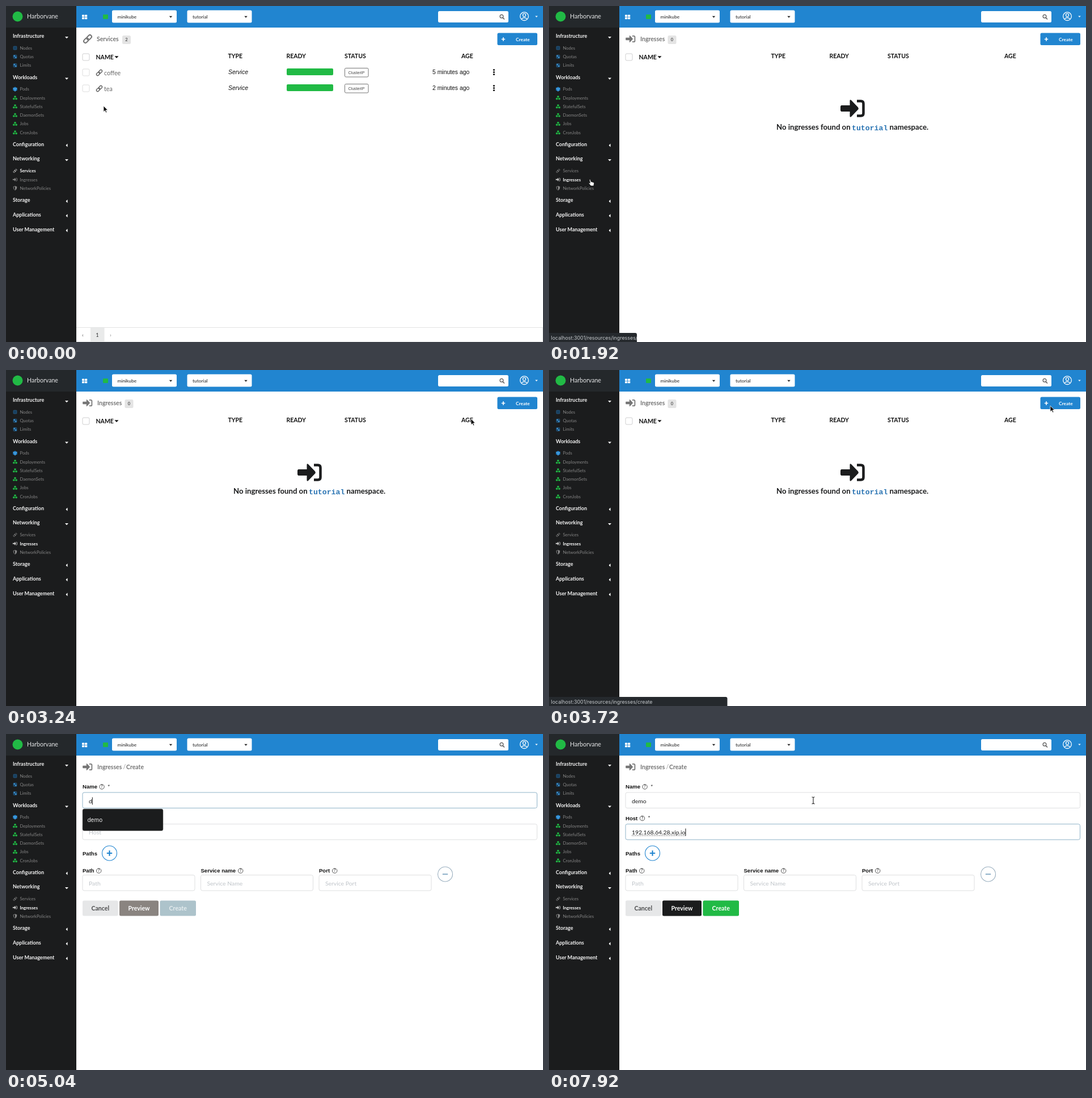
Animation of 947x592 px, one loop 8000 ms. Source, as an HTML page:

```html
<!DOCTYPE html>
<html lang="en">
<head>
<meta charset="utf-8">
<title>Ingress demo</title>
<style>
html, body { margin: 0; width: 100%; height: 100%; overflow: hidden; background: #fff; }
svg { display: block; width: 947px; height: 592px; }
text { font-family: Lato, sans-serif; white-space: pre; }
.b { font-weight: 700; }
.h { font-family: "Liberation Sans", Arial, sans-serif; }
.m { font-family: "Liberation Mono", monospace; }
.s { font-family: Inter, sans-serif; }
</style>
</head>
<body>
<svg id="stage" viewBox="0 0 947 592"></svg>
<script>
const stage = document.getElementById('stage');
const pen = document.createElement('canvas').getContext('2d');
const LOOP = 8000, STEP = 120;
const BLUE = '#2185d0', GREEN = '#21ba45', DARK = '#1b1c1d';
const HOST = '192.168.64.28.xip.io';

// Drawing helpers; text is placed by the middle of its capitals.
const text = (x, mid, str, size, fill = DARK, cls = '', extra = '') =>
  `<text x="${x}" y="${mid + size * .36}" font-size="${size}" fill="${fill}" class="${cls}" ${extra}>${str}</text>`;
const rect = (x, y, w, h, fill, r = 0, extra = '') =>
  `<rect x="${x}" y="${y}" width="${w}" height="${h}" rx="${r}" fill="${fill}" ${extra}/>`;
const box = (x, y, w, h, stroke, r = 3) => rect(x, y, w, h, '#fff', r, `stroke="${stroke}"`);
const circle = (x, y, r, fill, stroke = 'none', w = 1) =>
  `<circle cx="${x}" cy="${y}" r="${r}" fill="${fill}" stroke="${stroke}" stroke-width="${w}"/>`;
const path = (d, fill, stroke = 'none', w = 1) =>
  `<path d="${d}" fill="${fill}" stroke="${stroke}" stroke-width="${w}"/>`;
const at = (x, y, scale, body, turn = 0) =>
  `<g transform="translate(${x} ${y}) rotate(${turn}) scale(${scale})">${body}</g>`;
const down = (x, y, s, fill) => path(`M${x - s} ${y - s / 2}h${2 * s}l${-s} ${s * 1.1}z`, fill);
const cross = (x, y, s, w, color, upright = true) =>
  path(`M${x - s} ${y}h${2 * s}` + (upright ? `M${x} ${y - s}v${2 * s}` : ''), 'none', color, w);
const widthOf = str => {
  pen.font = '10.4px Lato, sans-serif';
  return pen.measureText(str).width;
};
const caret = (str, mid) => rect(146 + widthOf(str), mid - 6.5, 1, 13, '#111');

// Icons
const link = (x, y, scale, color) => at(x, y, scale, ['-8.6', '-1'].map(left =>
  rect(left, -3, 9.6, 6, 'none', 3, `stroke="${color}" stroke-width="2"`)).join(''), -45);
const enter = (x, y, scale, color) => at(x, y, scale,
  path('M-20.500 -5.500h15v-8q0-3 2.500-1l12 12.500q1.500 2 0 4l-12 12.500q-2.500 2-2.500-1v-8h-15q-1.500-1-1.500-2.500v-6q0-2 1.500-2.500z', color) +
  path('M7 -13h7q4.500 0 4.500 4.500v17q0 4.500-4.500 4.500h-7', 'none', color, 4.500));
const cubes = (x, y) => [[0, -2], [-2.1, 1.600], [2.1, 1.600]].map(([dx, dy]) =>
  path(`M${x + dx} ${y + dy - 2}l2 1v2l-2 1-2-1v-2z`, GREEN, DARK, .4)).join('');
const panel = (x, y) => rect(x - 3, y - 3, 6, 6, '#173f60', 1, `stroke="#2d638b" stroke-width=".7"`);
const tiles = (x, y) => panel(x, y) + rect(x - 2.5, y - 2.5, 2.500, 2.500, '#3d8fcc') + rect(x, y, 2.500, 2.500, '#3d8fcc');
const cube = (x, y) => path(`M${x} ${y - 4}l3.700 2v4l-3.700 2-3.700-2v-4z`, BLUE) +
  path(`M${x - 3.5} ${y - 2}l3.500 2 3.500-2M${x} ${y}v4`, 'none', '#9ccbea', .6);
const shield = (x, y, c) => path(`M${x} ${y - 3.5}l3 1q0 4.500-3 6-3-1.500-3-6z`, 'none', c, .9) +
  path(`M${x} ${y - 3.5}l3 1q0 4.500-3 6z`, c);
const help = (x, y) => circle(x, y, 4.2, 'none', '#444', .9) + text(x, y, '?', 6.5, '#333', 'b', 'text-anchor="middle"');

function sidebar(page, t) {
  let out = rect(0, 0, 124, 592, DARK) + rect(0, 0, 124, 38, '#24282b') +
    circle(20.500, 18.500, 9, GREEN) + text(37, 18.500, 'Harborvane', 10.6, '#e4e5e6');
  const heads = [['Infrastructure', 53, 1], ['Workloads', 125.500, 1], ['Configuration', 243.500, 0],
    ['Networking', 269, 1], ['Storage', 342, 0], ['Applications', 367.500, 0], ['User Management', 393.500, 0]];
  for (const [name, y, open] of heads)
    out += text(12, y, name, 9, '#f4f4f4', 'b') +
      (open ? down(107, y + 2.5, 3, '#fff') : path(`M108.500 ${y - 1}v6l-3-3z`, '#fff'));
  const groups = [[74, ['Nodes', 'Quotas', 'Limits']],
    [146.500, ['Pods', 'Deployments', 'StatefulSets', 'DaemonSets', 'Jobs', 'CronJobs']],
    [290.500, ['Services', 'Ingresses', 'NetworkPolicies']]];
  const icons = { Nodes: panel, Quotas: tiles, Limits: tiles, Pods: cube,
    Services: (x, y, c) => link(x, y, .43, c), Ingresses: (x, y, c) => enter(x, y, .19, c), NetworkPolicies: shield };
  const active = page ? 'Ingresses' : 'Services';
  for (const [top, names] of groups) names.forEach((name, i) => {
    const y = top + i * 15.3, on = name === active;
    const hover = name === 'Ingresses' && t >= 1200;
    out += (icons[name] || cubes)(16, y, on ? '#ccc' : '#8a8a8a') +
      text(24.500, y, name, 7.65, on ? '#fff' : hover ? '#ddd' : '#868686', on ? 'b' : '');
  });
  return out;
}

function header() {
  let out = rect(124, 0, 823, 38, BLUE) + rect(171, 15, 9, 8, GREEN, 1);
  for (const x of [134, 139]) for (const y of [15.500, 19.700]) out += rect(x, y, 4.2, 3.5, '#fff', .5);
  for (const [x, name] of [[187, 'minikube'], [319.500, 'tutorial']])
    out += rect(x, 7.5, 114, 22, '#fff', 2.5) + text(x + 9.5, 19, name, 8.4) + down(x + 103.5, 19.2, 2.7, '#222');
  return out + rect(762, 9, 124, 20, '#fff', 2.5) +
    circle(874, 18.300, 2.9, 'none', '#555', 1.2) + path('M876 20.500l3 3', 'none', '#555', 1.5) +
    circle(914, 18.200, 7.3, 'none', '#fff', 1.3) + circle(914, 16, 2.6, 'none', '#fff', 1.2) +
    path('M909 23q5-5 10 0', 'none', '#fff', 1.3) + down(935.500, 18.700, 2.3, '#fff');
}

function list(page) {
  const count = page ? 0 : 2, bx = page ? 209.500 : 205;
  let out = page ? enter(144, 58, .4, '#767676') + text(161, 58.500, 'Ingresses', 10.5, '#767676', 'b')
    : link(144, 58, 1, '#767676') + text(160, 58.500, 'Services', 10.5, '#767676', 'b');
  out += rect(bx, 52, 15, 15, '#e4e4e4', 2.5) + text(bx + 7.5, 59.500, count, 7.5, '#555', 'b', 'text-anchor="middle"') +
    rect(866.500, 47.500, 70.500, 21.500, BLUE, 2.5) + cross(877, 58.500, 3.2, 1.7, '#fff') +
    text(899, 58.500, 'Create', 8.4, '#fff', 'b') + box(135, 84, 12, 12, '#cfcfd0', 2) +
    text(158.500, 90, 'NAME', 10.5, '#111', 'b') + down(195, 90, 3.5, '#111');
  for (const [x, name] of [[391.500, 'TYPE'], [494.500, 'READY'], [597, 'STATUS'], [803, 'AGE']])
    out += text(x, 88, name, 10.5, '#111', 'b');
  if (page) return out + enter(536, 180.500, 1, DARK) +
    text(401, 213.500, 'No ingresses found on', 13.2, DARK, 'b') +
    text(534, 213.800, 'tutorial', 13.2, '#2a74b3', 'b m') + text(600.500, 213.500, 'namespace.', 13.2, DARK, 'b');
  [['coffee', 5], ['tea', 2]].forEach(([name, age], i) => {
    const y = 116 + 28 * i;
    out += box(135, y - 5, 12, 12, '#dedede', 2) + link(164.500, y + 1.5, .72, '#666') +
      text(173, y + 1.8, name, 10.7, '#666') +
      text(392, y, 'Service', 10.5, '#111', 'h', 'font-style="italic"') +
      rect(495, y - 6, 82, 12, GREEN, 2) + box(597.500, y - 6.5, 41.500, 15.500, '#767676', 2) +
      text(603.500, y + 1, 'ClusterIP', 7.05, '#444', 'h') +
      text(752, y, age + ' minutes ago', 10.4, '#111', 'h');
    for (const dy of [-3.5, .5, 4.5]) out += circle(860.500, y + dy, 1.6, '#111');
  });
  return out + rect(124, 566, 823, 26, '#fff') + rect(149, 567, 24.500, 24, '#e9eaea') +
    path('M124 566.500h823M124 591.500h823M946.500 566v26', 'none', '#e2e3e3') +
    text(134, 579, '‹', 10, '#555') + text(158.500, 579.500, '1', 8.5) + text(183, 579, '›', 10, '#888');
}

function form(t) {
  const onName = t >= 4800 && t < 6000, onHost = t >= 6000;
  const typed = 'demo'.slice(0, [5040, 5160, 5400, 5520].filter(k => t >= k).length);
  const filled = t >= 6840, fade = Math.max(0, Math.min(1, (t - 6720) / 360));
  const edge = on => on ? '#8fb3c8' : '#dedfe0', hint = '#bfc4c9';
  const label = (x, y, name, hx) => text(x, y, name, 9.55, '#111', 'b h') + (hx ? help(hx, y) : '');
  const star = (x, y) => text(x, y, '*', 9, '#333', 'h');
  let out = enter(144, 58, .4, '#767676') + text(161, 58.500, 'Ingresses', 10.5, '#767676', 'b') +
    text(206.500, 58.500, '/', 10.5, '#999') + text(212, 58.500, 'Create', 10.5, '#767676', 'b') +
    label(135, 93, 'Name', 169) + star(179.500, 91.500) +
    label(135, 148.500, 'Host', 164.500) + star(174.700, 146.500) +
    box(135, 103, 801.500, 27.500, edge(onName)) + box(135, 158.700, 801.500, 27.500, edge(onHost)) +
    (typed ? text(146, 118, typed, 10.4) : text(146, 118, 'Name', 10.4, onName ? '#8c8c8c' : hint)) +
    (filled ? text(146, 173.500, HOST, 10.4) +
      `<path d="M146 179h${widthOf(HOST)}" stroke="#444" stroke-dasharray="1.500 1.500"/>`
      : text(146, 173.500, 'Host', 10.4, onHost ? '#8c8c8c' : hint));
  if (onName) out += caret(typed, 118);
  if (t >= 6000 && t < 6240 || t >= 6600 && t < 7440 || t >= 7920) out += caret(filled ? HOST : '', 173);
  out += label(135, 210.500, 'Paths') + circle(182.500, 210, 13, '#fff', BLUE, 1.1) + cross(182.500, 210, 4.7, 2.2, BLUE) +
    circle(774.500, 247, 13, '#fff', '#9aafbf', 1.1) + cross(774.500, 247, 4.7, 2.2, '#94b5cc', false);
  for (const [x, name, hx, ph] of [[135, 'Path', 163.700, 'Path'], [343.500, 'Service name', 413.700, 'Service Name'],
    [552, 'Port', 579.700, 'Service Port']])
    out += label(x, 241, name, hx) + box(x, 248.500, 198, 27.500, '#dedfe0') + text(x + 11, 263, ph, 10.4, hint);
  const button = (x, w, name, off, on, ink) => rect(x, 293.500, w, 27, off, 2.5) +
    rect(x, 293.500, w, 27, on, 2.5, `opacity="${fade}"`) +
    text(x + w / 2, 307.300, name, 10.6, ink, 'b', 'text-anchor="middle"');
  out += button(135, 62.500, 'Cancel', '#e6e7e8', '#e6e7e8', '#4c4d4e') +
    button(200, 69, 'Preview', '#8a8480', DARK, '#fff') +
    button(271.500, 63.500, 'Create', '#adc3cb', GREEN, fade > .5 ? '#fff' : '#e6edef');
  if (t >= 5040 && t < 5760)
    out += rect(135, 132, 142, 38.500, DARK, 3, 'stroke="#777" stroke-width=".5"') + text(143.500, 151.300, 'demo', 10, '#eee', 's');
  return out;
}

function statusBar(t) {
  const bar = (w, tail) => path(`M0 576h${w - 3}q3 0 3 3v13H0z`, '#25292d') +
    text(3.500, 584.300, 'localhost:3001/resources/' + tail, 8.9, '#c6cacd', 's');
  if (t >= 1680 && t < 2280) return bar(155, 'ingresses/');
  if (t >= 2280 && t < 2880) return bar(155, 'services/');
  if (t >= 3600 && t < 4320) return bar(314.500, 'ingresses/create');
  return '';
}

// Pointer stops: time, x, y
const stops = [[0, 172, 176], [240, 172, 176], [480, 92, 356], [720, 92, 356], [1440, 72, 306], [2160, 72, 306],
  [2280, 66, 290], [2640, 591, 111], [3240, 820, 86], [3720, 884, 63], [4080, 884, 63], [4800, 466, 117], [LOOP, 466, 117]];

function pointer(t) {
  if (t >= 5040 && t < 7800) return '';
  const i = stops.findIndex(s => s[0] > t), [t0, x0, y0] = stops[i - 1], [t1, x1, y1] = stops[i];
  const k = (t - t0) / (t1 - t0), x = x0 + (x1 - x0) * k, y = y0 + (y1 - y0) * k;
  if (t >= 4680) return at(x, y, 1, path('M-2.500 -6q2.500 0 2.500 1.500v9q0 1.500-2.500 1.500M2.500 -6q-2.500 0-2.500 1.500v9q0 1.500 2.500 1.500', 'none', '#222', 1.1));
  if (x < 124 || t > 3720 && t < 4200)
    return at(x, y, 1, path('M-1 0q1-1.500 2 0l1 3.500 4 1q1.500.5 1.500 2l-.7 4.500h-5l-3.500-4.500q0-1.500 1.500-1l.8.7z', '#fff', '#111', .8));
  return at(x, y, 1, path('M0 0v10.500l2.500-2.300 1.700 3.800 1.700-.8-1.700-3.600h3.300z', '#111', '#fff', .7));
}

function draw(t) {
  const page = t < 1800 ? 0 : t < 4080 ? 1 : 2;
  stage.innerHTML = rect(0, 0, 947, 592, '#fff') + (page < 2 ? list(page) : form(t)) +
    sidebar(page, t) + header() + statusBar(t) + pointer(t);
}

let shown = -1;
function tick() {
  const t = Math.floor(performance.now() % LOOP / STEP) * STEP;
  if (t !== shown) draw(shown = t);
  requestAnimationFrame(tick);
}
tick();
</script>
</body>
</html>
```
